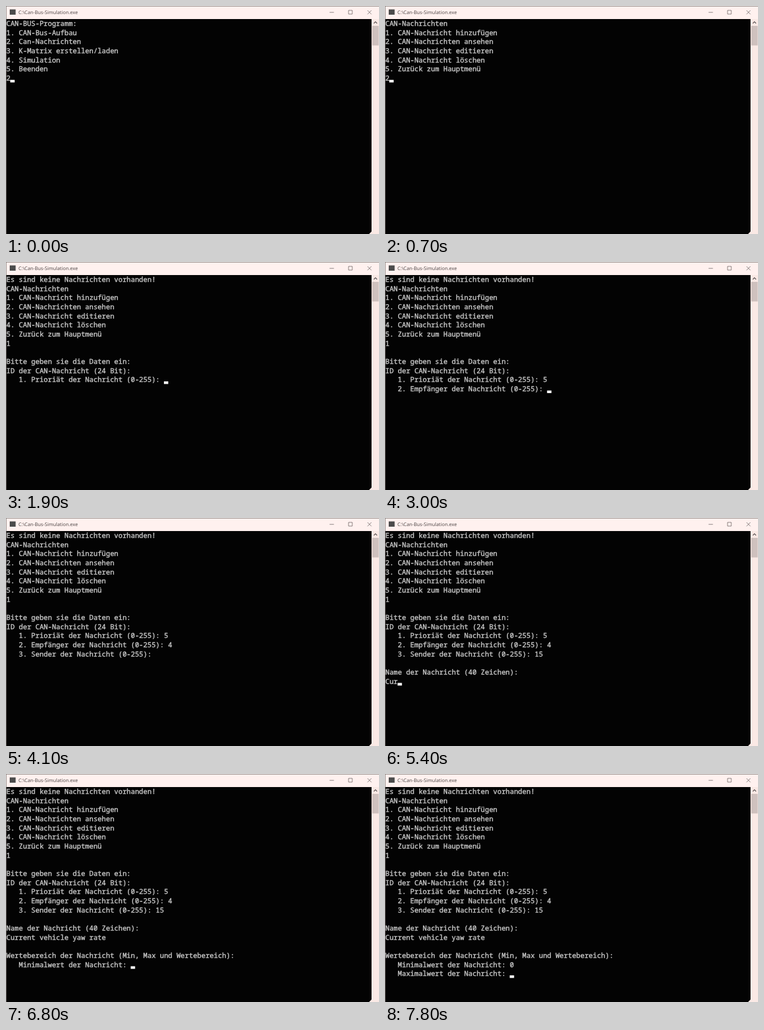
Recreate the animation shown at these times as an HTML page. Size 600x367 px, loop 8000 ms.

```html
<!DOCTYPE html>
<html lang="de">
<head>
<meta charset="utf-8">
<title>Konsole</title>
<style>
  html, body { margin: 0; width: 100%; height: 100%; overflow: hidden; background: #030303; }
  svg { display: block; width: 600px; height: 367px; }
  text { white-space: pre; text-rendering: geometricPrecision; }
  #rows { font: 11.13px "Noto Sans Mono", "DejaVu Sans Mono", monospace; fill: #c9c9c9; stroke: #c9c9c9; stroke-width: .38; }
  .title { font: 7.78px "Open Sans", "Noto Sans", sans-serif; fill: #4a4343; }
  .line { fill: none; stroke: #5a5252; stroke-width: .7; }
</style>
</head>
<body>
<svg viewBox="0 0 600 367">
  <rect width="600" height="367" fill="#030303"/>
  <rect width="600" height="21" fill="#fff1ef"/>
  <path d="M0 .4h600M.4 0v367" stroke="#7d7472" stroke-width=".8"/>
  <rect x="6" y="5.5" width="9.5" height="8.5" fill="#4b4b4b"/>
  <text class="title" x="20" y="13">C:\Can-Bus-Simulation.exe</text>
  <path class="line" d="M520.5 10.2h7M551 7h6v6h-6zM581.5 7l6.3 6.3M587.8 7l-6.3 6.3"/>
  <rect x="588" y="21" width="12" height="346" fill="#fae9e5"/>
  <path class="line" d="M591.7 28l2.6-2.6 2.6 2.6" style="stroke-width:1.1"/>
  <rect x="589" y="32" width="10.5" height="31.5" fill="#cfc1be"/>
  <path d="M584 367l4-4v4z" fill="#fae9e5"/>
  <g id="rows"></g>
  <rect id="cursor" width="7" height="4.2" fill="#fff"/>
</svg>
<script>
const LOOP = 8000, CELL = 6.68, ROW = 14.66, TOP = 21;

const mainMenu = `CAN-BUS-Programm:
1. CAN-Bus-Aufbau
2. Can-Nachrichten
3. K-Matrix erstellen/laden
4. Simulation
5. Beenden
`;
const messageMenu = `CAN-Nachrichten
1. CAN-Nachricht hinzufügen
2. CAN-Nachrichten ansehen
3. CAN-Nachricht editieren
4. CAN-Nachricht löschen
5. Zurück zum Hauptmenü
`;

// [time, output]; a form feed clears the screen
const output = [
  [0, mainMenu + "2"],
  [200, "\f" + messageMenu],
  [600, "2"],
  [1000, "\fEs sind keine Nachrichten vorhanden!\n" + messageMenu],
  [1600, "1"],
  [1800, "\n\nBitte geben sie die Daten ein:\nID der CAN-Nachricht (24 Bit):\n   1. Prioriät der Nachricht (0-255): "],
  [2400, "5"],
  [2600, "\n   2. Empfänger der Nachricht (0-255): "],
  [3400, "4"],
  [3800, "\n   3. Sender der Nachricht (0-255): "],
  [4400, "1"],
  [4500, "5"],
  [4700, "\n\nName der Nachricht (40 Zeichen):\n"],
  [5000, "C"], [5200, "u"], [5400, "r"],
  [5500, "re"], [5600, "nt "], [5700, "ve"], [5800, "hic"],
  [5900, "l"], [6000, "e "], [6100, "y"], [6200, "aw"],
  [6300, " "], [6400, "ra"], [6500, "t"], [6600, "e"],
  [6800, "\n\nWertebereich der Nachricht (Min, Max und Wertebereich):\n   Minimalwert der Nachricht: "],
  [7400, "0"],
  [7600, "\n   Maximalwert der Nachricht: "]
];
const cursorOff = [[2200, 2400], [2800, 3000], [4100, 4400]];

const rows = document.getElementById("rows");
const cursor = document.getElementById("cursor");
const lines = Array.from({ length: 21 }, (_, i) => {
  const line = document.createElementNS("http://www.w3.org/2000/svg", "text");
  line.setAttribute("x", 0.5);
  line.setAttribute("y", TOP + 11.1 + i * ROW);
  return rows.appendChild(line);
});

function screenAt(t) {
  const all = output.filter(([time]) => time <= t).map(([, text]) => text).join("");
  return all.split("\f").pop().split("\n");
}

function draw(now) {
  const t = now % LOOP;
  const screen = screenAt(t);
  const last = screen.length - 1;
  lines.forEach((line, i) => {
    const text = screen[i] || "";
    if (line.textContent !== text) line.textContent = text;
  });
  cursor.setAttribute("x", 0.2 + screen[last].length * CELL);
  cursor.setAttribute("y", TOP + 9.9 + last * ROW);
  const hidden = cursorOff.some(([from, to]) => t >= from && t < to);
  cursor.setAttribute("visibility", hidden ? "hidden" : "visible");
}

const start = performance.now();
function tick() {
  draw(performance.now() - start);
  requestAnimationFrame(tick);
}
tick();
</script>
</body>
</html>
```
